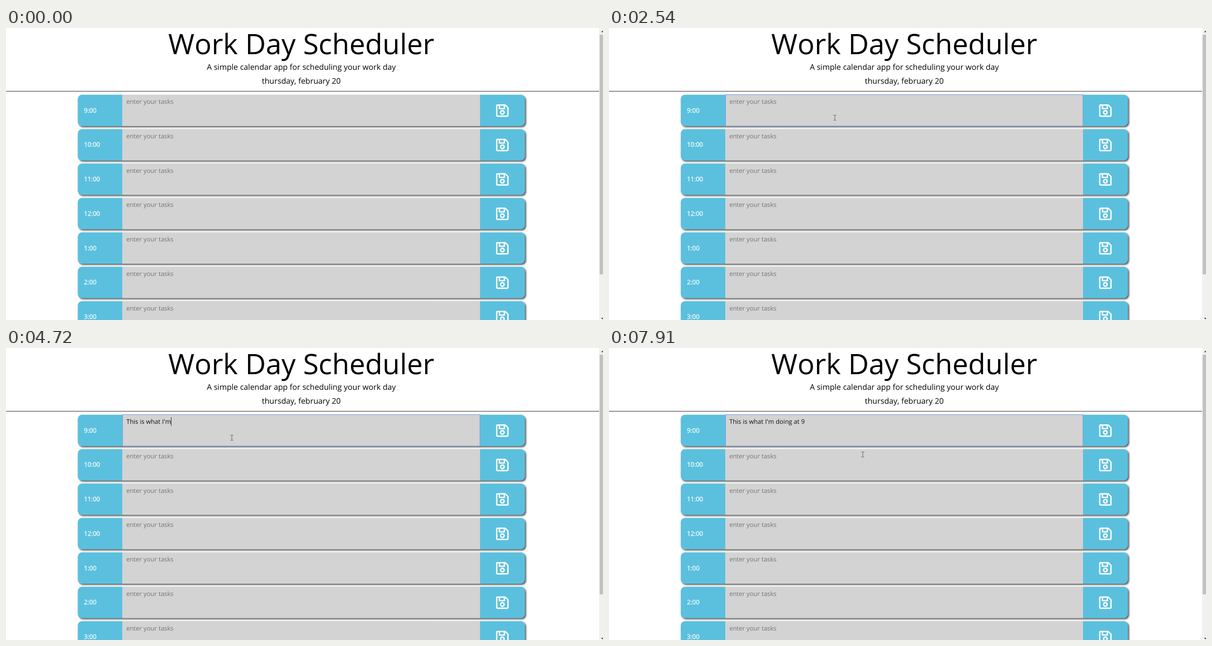
An HTML page that plays this animation: 1068 px wide and 524 px high, repeating every 7990 ms.

```html
<!DOCTYPE html>
<html lang="en">
<head>
<meta charset="utf-8">
<title>Work Day Scheduler</title>
<style>
  html, body { margin: 0; width: 100%; height: 100%; overflow: hidden; background: #fff; }
  svg { display: block; width: 1068px; height: 524px; }
  text {
    font-family: "Open Sans", sans-serif; font-size: 11.23px; font-kerning: none;
    text-rendering: geometricPrecision; white-space: pre;
  }
  .title { font-size: 50.53px; }
  .lead { font-size: 14.04px; }
  .hour { fill: #fff; stroke: #fff; stroke-width: .25px; }
  .hint { fill: #757575; }
  .row { fill: url(#bands); filter: drop-shadow(2.1px 2.1px 1.5px #555); }
</style>
</head>
<body>
<svg viewBox="0 0 1068 524">
  <defs>
    <linearGradient id="bands">
      <stop offset=".1" stop-color="#5bc0de"/>
      <stop offset=".1" stop-color="#d3d3d3"/>
      <stop offset=".9" stop-color="#d3d3d3"/>
      <stop offset=".9" stop-color="#5bc0de"/>
    </linearGradient>
    <g id="save" fill="none" stroke="#fff" stroke-width="48" stroke-linejoin="round">
      <path d="M48 24H316Q327 24 333 30L418 115Q424 121 424 132V400Q424 424 400 424H48Q24 424 24 400V48Q24 24 48 24Z"/>
      <path d="M120 24V152H296V24"/>
      <circle cx="224" cy="288" r="64"/>
    </g>
  </defs>
  <g text-anchor="middle">
    <text class="title" x="528.3" y="46.8">Work Day Scheduler</text>
    <text class="lead" x="528.3" y="75">A simple calendar app for scheduling your work day</text>
    <text class="lead" x="528.3" y="100.4">thursday, february 20</text>
  </g>
  <rect y="113" width="1061" height="1" fill="#444"/>
  <g id="rows"></g>
  <rect id="focus" x="208.5" y="119.6" width="639.4" height="56.4" fill="none" stroke="#6f97d8" stroke-width=".9"/>
  <text id="typed" x="215.2" y="136.2" fill="#111" xml:space="preserve"></text>
  <rect id="caret" y="124.2" width=".9" height="15.4" fill="#222"/>
  <circle id="click" cx="403" cy="160.5" r="8" fill="#e8e45f"/>
  <path id="cursor" d="M-2.6-4.6H-.8L0-4L.8-4.6H2.6M0-4V4M-2.6 4.6H-.8L0 4L.8 4.6H2.6" fill="none" stroke="#555" stroke-width=".8"/>
  <rect x="1061" width="7" height="524" fill="#f1f1f1"/>
  <rect x="1062" y="12" width="6" height="430" fill="#c1c1c1"/>
  <path d="M1064.3 7.5L1067 4.7L1069.7 7.5ZM1064.3 520L1067 522.8L1069.7 520Z" fill="#505050"/>
</svg>
<script>
const LOOP = 7990, TEXT_X = 215.2, FOCUS = 930, CLICK = 1000, CLICK_END = 1140, BLINK = 535;

// Words and the moments their typing starts
const WORDS = ["This ", "is ", "what ", "I'm ", "doing ", "at ", "9"];
const STARTS = [3000, 3540, 3930, 4490, 5040, 5500, 6890];

// Letters fill three quarters of the time until the next word, at 100 ms each at most
const KEYS = WORDS.flatMap((word, i) => {
  const gap = ((STARTS[i + 1] ?? LOOP) - STARTS[i]) * .75;
  const step = Math.min(100, gap / word.length);
  return [...word].map((char, n) => ({ char, time: STARTS[i] + n * step }));
});

// Cursor travels, slowing down towards the end
const MOVES = [
  { start: 130, end: 300, from: [756, 410], to: [478, 293] },
  { start: 540, end: 930, from: [476, 288], to: [404, 161] },
  { start: 7760, end: 7910, from: [406, 163], to: [454, 191] }
];
const FRAME = 80;

const $ = id => document.getElementById(id);
const show = (el, on) => el.setAttribute("visibility", on ? "visible" : "hidden");

$("rows").innerHTML = Array.from({ length: 7 }, (_, i) => `
  <g transform="translate(0 ${(119.8 + i * 61.75).toFixed(2)})">
    <rect class="row" x="128.4" width="800" height="56.1" rx="7.5"/>
    <text class="hour" x="139.6" y="31.8">${(8 + i) % 12 + 1}:00</text>
    <text class="hint" x="${TEXT_X}" y="16.4">enter your tasks</text>
    <use href="#save" transform="translate(876.7 17.2) scale(.0502)"/>
  </g>`).join("");

const hint = document.querySelector(".hint");
const typed = $("typed"), caret = $("caret"), cursor = $("cursor");

function cursorAt({ start, end, from, to }, t) {
  const steps = Math.round((end - start) / FRAME);
  const p = Math.min(1, Math.floor((t - start) / (end - start) * steps) / steps);
  const eased = 1 - (1 - p) ** 1.5;
  return from.map((a, i) => a + (to[i] - a) * eased);
}

function draw(t) {
  const keys = KEYS.filter(key => key.time <= t);
  const text = keys.map(key => key.char).join("");
  if (typed.textContent !== text) typed.textContent = text;
  show(hint, !text);
  show($("focus"), t >= FOCUS);
  show($("click"), t >= CLICK && t < CLICK_END);

  const width = text ? typed.getComputedTextLength() : 0;
  const awake = keys.at(-1)?.time ?? FOCUS;
  caret.setAttribute("x", TEXT_X + width - .3);
  show(caret, t >= FOCUS && Math.floor((t - awake) / BLINK) % 2 === 0);

  const move = MOVES.findLast(m => m.start <= t);
  show(cursor, move);
  if (move) cursor.setAttribute("transform", `translate(${cursorAt(move, t)})`);
}

function tick() {
  draw(performance.now() % LOOP);
  requestAnimationFrame(tick);
}
tick();
</script>
</body>
</html>
```
